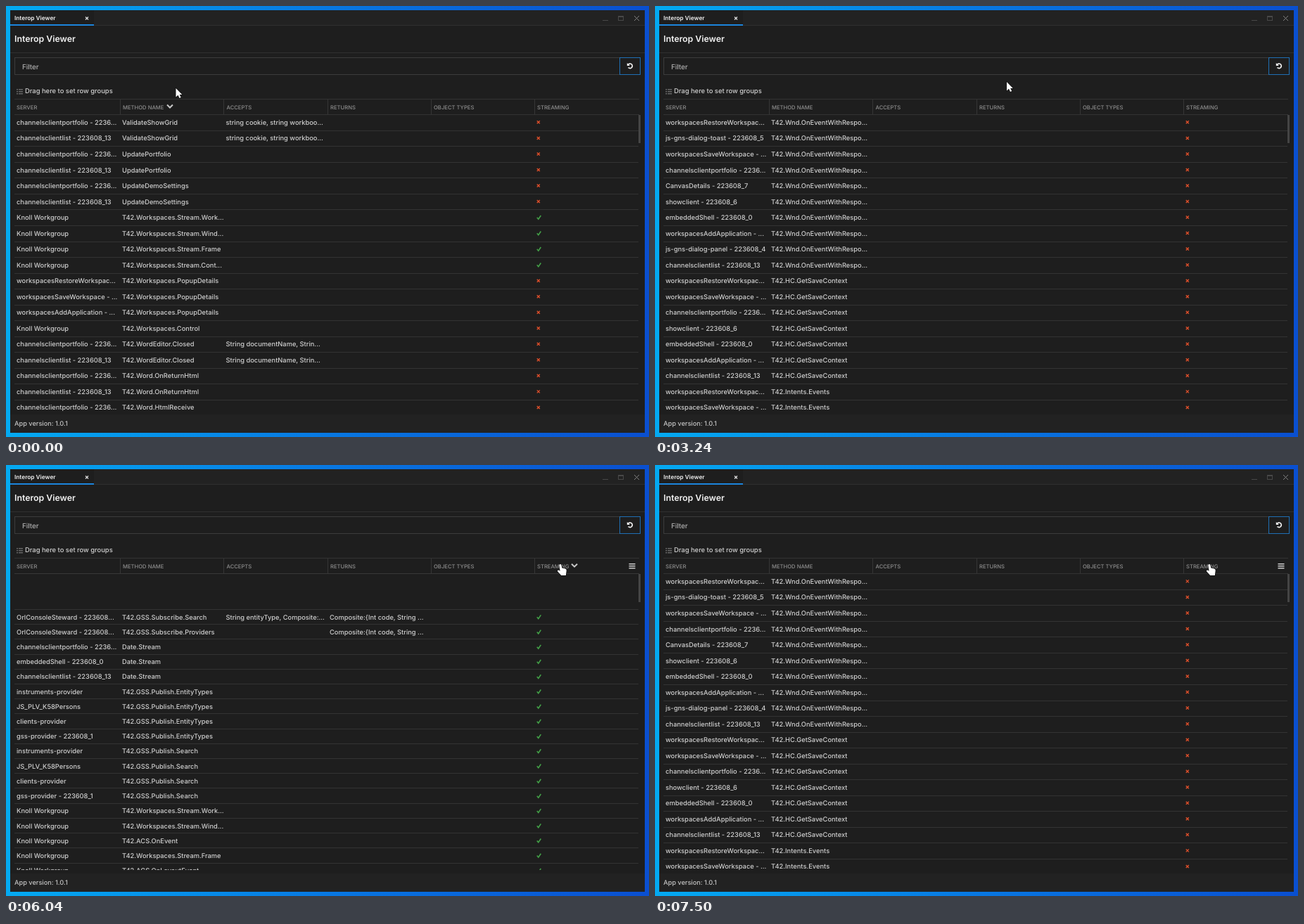
Recreate the animation shown at these times as an HTML page with a canvas. Size 914 by 613 pixels, loop 8 s.

```html
<!DOCTYPE html>
<html lang="en">
<head>
<meta charset="utf-8">
<title>Interop Viewer</title>
<style>
  html, body { margin: 0; width: 100%; height: 100%; overflow: hidden; background: #1e1e1e; }
  canvas { display: block; }
</style>
</head>
<body>
<canvas id="stage" width="914" height="613"></canvas>
<script>
const ctx = document.getElementById('stage').getContext('2d');
ctx.textRendering = 'geometricPrecision';
const LOOP = 8000;
const ROW = 22.53, GRID_TOP = 154.3, GRID_BOTTOM = 576;
const OFF = 22.3;          // row index just below the viewport where moving rows are parked
const SORT_TIME = 288;
const COLUMNS = [15, 165, 312.5, 460];
const HEADERS = [['SERVER', 15], ['METHOD NAME', 166], ['ACCEPTS', 313.5],
  ['RETURNS', 461], ['OBJECT TYPES', 608], ['STREAMING', 755]];

const portfolio = 'channelsclientportfolio - 2236...';
const list = 'channelsclientlist - 223608_13';
const hub = 'Knoll Workgroup';
const restore = 'workspacesRestoreWorkspac...';
const save = 'workspacesSaveWorkspace - ...';
const addApp = 'workspacesAddApplication - ...';
const show = 'showclient - 223608_6';
const shell = 'embeddedShell - 223608_0';
const desktop = 'OrlConsoleSteward - 223608...';
const providers = ['instruments-provider', 'JS_PLV_K58Persons', 'clients-provider', 'gss-provider - 223608_1'];

// One row per server, all sharing the same method
const group = (servers, method, streaming = false, accepts = '', returns = '') =>
  servers.map(server => ({ cells: [server, method, accepts, returns], streaming }));

const pair = [portfolio, list];
const composite = 'Composite:{Int code, String ...';

const byMethod = [
  ...group(pair, 'ValidateShowGrid', false, 'string cookie, string workboo...'),
  ...group(pair, 'UpdatePortfolio'),
  ...group(pair, 'UpdateDemoSettings'),
  ...['Work...', 'Wind...', 'Frame', 'Cont...'].flatMap(s => group([hub], 'T42.Workspaces.Stream.' + s, true)),
  ...group([restore, save, addApp], 'T42.Workspaces.PopupDetails'),
  ...group([hub], 'T42.Workspaces.Control'),
  ...group(pair, 'T42.WordEditor.Closed', false, 'String documentName, Strin...'),
  ...group(pair, 'T42.Word.OnReturnHtml'),
  ...group([portfolio], 'T42.Word.HtmlReceive')
];
const unsorted = [
  ...group([restore, 'js-gns-dialog-toast - 223608_5', save, portfolio, 'CanvasDetails - 223608_7', show,
    shell, addApp, 'js-gns-dialog-panel - 223608_4', list], 'T42.Wnd.OnEventWithRespo...'),
  ...group([restore, save, portfolio, show, shell, addApp, list], 'T42.HC.GetSaveContext'),
  ...group([restore, save], 'T42.Intents.Events')
];
const byStreaming = [
  ...group([desktop], 'T42.GSS.Subscribe.EntityTypes', true, '', composite),
  ...group([desktop], 'T42.GSS.Subscribe.Search', true, 'String entityType, Composite:...', composite),
  ...group([desktop], 'T42.GSS.Subscribe.Providers', true, '', composite),
  ...group([portfolio, shell, list], 'Date.Stream', true),
  ...group(providers, 'T42.GSS.Publish.EntityTypes', true),
  ...group(providers, 'T42.GSS.Publish.Search', true),
  ...['Workspaces.Stream.Work...', 'Workspaces.Stream.Wind...', 'ACS.OnEvent',
    'Workspaces.Stream.Frame', 'ACS.OnLayoutEvent'].flatMap(m => group([hub], 'T42.' + m, true))
];
byStreaming[0].late = true;

const park = () => OFF;
const SORTS = [
  { at: 1528, from: byMethod, to: unsorted,
    leave: i => i >= 10 && i <= 12 ? i + 10 : OFF, enter: i => Math.min(i + 20, OFF) },
  { at: 5839, from: unsorted, to: byStreaming, leave: park, enter: park },
  { at: 7215, from: byStreaming, to: unsorted, leave: park, enter: park }
];
const CLICKS = [1425, 4480, 5730, 7120];
const POINTER = [[0, 241.5, 117], [860, 241.5, 117], [1000, 239, 121], [1180, 230, 135], [1350, 223.5, 144],
  [2670, 223.5, 144], [2900, 300, 122], [3150, 450, 106], [3465, 623, 113], [3900, 755, 131],
  [4180, 789, 141], [4309, 789, 141], [4310, 788, 140], [LOOP, 788, 140]];

const ARROW = new Path2D('M0 0V12.4L3 9.8L5 14L7.2 13L5.2 9H8.8Z');
const HAND = new Path2D('M-1.7 2.5Q-.2-.2 1.4 2.4L2.4 6.4L7 7.5Q9 8.2 8.7 10.2L7.8 17H1.2L-4 11.3Q-4.6 9.2-2.4 9.5L-.4 10.8Z');

const mix = (a, b, p) => a + (b - a) * p;

// The standard CSS "ease" curve, solved by bisection
function ease(x) {
  if (x <= 0) return 0;
  if (x >= 1) return 1;
  let lo = 0, hi = 1, u;
  for (let i = 0; i < 24; i++) {
    u = (lo + hi) / 2;
    if (.75 * u * (1 - u) + u ** 3 < x) lo = u; else hi = u;
  }
  return .3 * u * (1 - u) ** 2 + 3 * u * u * (1 - u) + u ** 3;
}

function box(x, y, w, h, color) {
  ctx.fillStyle = color;
  ctx.fillRect(x, y, w, h);
}
function frame(x, y, w, h, color) {
  ctx.strokeStyle = color;
  ctx.lineWidth = 1;
  ctx.strokeRect(x + .5, y + .5, w - 1, h - 1);
}
function text(str, x, y, size, color, weight = 500) {
  ctx.font = `${weight} ${size}px Inter, sans-serif`;
  ctx.fillStyle = color;
  ctx.fillText(str, x, y + size * .36);
}
function line(points, color, width) {
  ctx.beginPath();
  points.forEach(([x, y]) => ctx.lineTo(x, y));
  ctx.strokeStyle = color;
  ctx.lineWidth = width;
  ctx.stroke();
}
function cross(x, y, r, color, width) {
  line([[x - r, y - r], [x + r, y + r]], color, width);
  line([[x - r, y + r], [x + r, y - r]], color, width);
}
function chevron(x, y, dir) {
  line([[x - 4, y - 2 * dir], [x, y + 2 * dir], [x + 4, y - 2 * dir]], '#c8c8c8', 2);
}
function menu(x) {
  for (const y of [140, 143, 146]) box(x, y, 9, 1.5, '#d0d0d0');
}

function drawWindow() {
  const sky = ctx.createLinearGradient(0, 0, 914, 0);
  sky.addColorStop(0, '#04aaf2');
  sky.addColorStop(.5, '#0878e2');
  sky.addColorStop(1, '#0a4fd0');
  box(0, 0, 914, 613, sky);
  box(6, 6, 902, 601, '#1e1e1e');
  box(6, 6, 902, 22, '#222222');
  box(6, 27, 902, 1, '#303030');
  box(6, 6, 119, 20, '#1e1e1e');
  box(6, 26, 119, 2, '#1b84dc');
  text('Interop Viewer', 12, 17.5, 8.3, '#f0f0f0', 600);
  cross(115, 17.5, 2, '#e0e0e0', 1.2);
  box(848, 20, 8, 1, '#484848');
  frame(870, 14, 8, 7, '#484848');
  box(870, 14, 8, 2, '#484848');
  cross(896.5, 17.5, 3.5, '#808080', 1);

  text('Interop Viewer', 12, 47, 12.3, '#f2f2f2', 600);
  box(6, 66, 902, 1, '#303030');
  frame(12, 73, 861, 25, '#3c3c3c');
  text('Filter', 23, 86, 9.8, '#b0b0b0');
  frame(872, 73, 30, 25, '#1f6fb5');
  ctx.beginPath();
  ctx.arc(887, 85.3, 3.3, -2.5, 2.4);
  ctx.strokeStyle = '#f0f0f0';
  ctx.lineWidth = 1.7;
  ctx.stroke();
  ctx.fillStyle = '#f0f0f0';
  ctx.fill(new Path2D('M882.8 81V85H886.8Z'));

  for (const y of [118, 121, 124]) {
    box(15, y, 2, 1.5, '#666');
    box(18, y, 6, 1.5, '#666');
  }
  text('Drag here to set row groups', 27, 120.7, 9.4, '#d0d0d0');
  box(12, 132, 888, 1, '#333');
  box(12, 154, 888, 1, '#383838');
  for (const x of [162, 309, 457, 604, 751]) box(x, 133, 1, 21, '#363636');
  for (const [label, x] of HEADERS) text(label, x, 144, 7.65, '#8e8e8e');

  box(6, 581, 902, 26, '#222222');
  text('App version: 1.0.1', 12, 594, 9.2, '#c4c4c4');
}

function drawRow(row, index) {
  const top = GRID_TOP + index * ROW, y = top + ROW / 2;
  if (top > GRID_BOTTOM) return;
  box(12, Math.round(top), 887, 1, '#333');
  row.cells.forEach((cell, i) => text(cell, COLUMNS[i], y, 9.3, '#d0d0d0'));
  if (row.streaming) line([[754.8, y], [756.8, y + 2.4], [760.3, y - 2.8]], '#43a047', 1.6);
  else cross(756.8, y - .2, 2, '#dc4f2b', 1.4);
}

function drawGrid(t) {
  const sort = SORTS.findLast(s => t >= s.at);
  const p = sort ? ease((t - sort.at) / SORT_TIME) : 0;
  ctx.save();
  ctx.beginPath();
  ctx.rect(12, 154, 888, GRID_BOTTOM - 154);
  ctx.clip();
  if (!sort) byMethod.forEach(drawRow);
  else {
    if (p < 1) sort.from.forEach((row, i) => drawRow(row, mix(i, sort.leave(i), p)));
    sort.to.forEach((row, i) => {
      if (!row.late || p > .97) drawRow(row, mix(sort.enter(i), i, p));
    });
  }
  ctx.restore();
  box(899, 155, 3, 40, '#444');
}

function pointerAt(t) {
  const i = POINTER.findIndex(k => k[0] > t);
  const [t0, x0, y0] = POINTER[i - 1], [t1, x1, y1] = POINTER[i];
  const p = (t - t0) / (t1 - t0);
  return [mix(x0, x1, p), mix(y0, y1, p)];
}

function drawPointer(t, x, y, hovering) {
  if (CLICKS.some(c => t >= c && t < c + 100)) {
    ctx.beginPath();
    ctx.arc(x - .3, y - .3, 9, 0, 7);
    ctx.fillStyle = 'rgba(184, 168, 14, .88)';
    ctx.fill();
  }
  ctx.save();
  ctx.translate(x, y);
  const shape = hovering ? HAND : ARROW;
  ctx.strokeStyle = '#111';
  ctx.lineWidth = 1.4;
  ctx.stroke(shape);
  ctx.fillStyle = '#fff';
  ctx.fill(shape);
  ctx.restore();
}

function draw(t) {
  const [x, y] = pointerAt(t);
  const hovering = y > 133;
  drawWindow();
  drawGrid(t);
  if (t < SORTS[0].at) chevron(233, 142.5, 1);
  if (t >= 4580 && t < SORTS[2].at) chevron(808, 142.7, t < SORTS[1].at ? -1 : 1);
  if (hovering) menu(x < 310 ? 296 : 885.5);
  drawPointer(t, x, y, hovering);
}

const start = performance.now();
function tick() {
  draw((performance.now() - start) % LOOP);
  requestAnimationFrame(tick);
}
tick();
</script>
</body>
</html>
```
